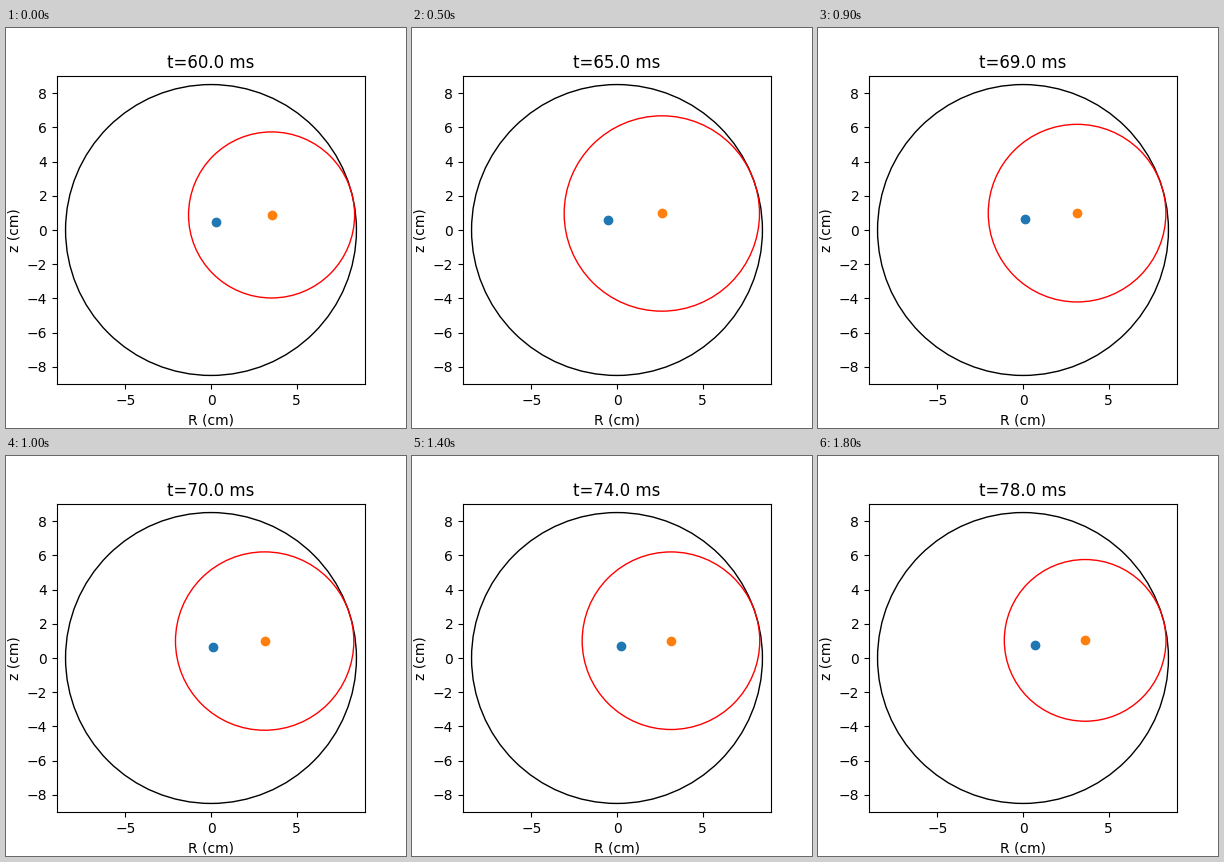
Recreate the animation shown at these times as a matplotlib script. Size 400x400 px, loop 1.9 s.

```python
import numpy as np
import matplotlib.pyplot as plt
from matplotlib.animation import FuncAnimation

WALL = 8.5              # vessel radius, cm
START, FRAMES = 60, 19  # ms
CRASH, RECOVERY = 4, 4  # ms from the start, ms of rebound


def smoothstep(x):
    x = np.clip(x, 0, 1)
    return x * x * (3 - 2 * x)


def plasma_centre(s):
    """Return R, z and the outward growth, s ms after the start."""
    if s < CRASH:                       # steady outward drift
        growth = 0.29 * s
        return 3.54 + growth, 0.88 - 0.023 * s, growth
    if s == CRASH:                      # sudden jump inward
        return 0.68, 0.44, 0
    u = s - CRASH - 1                   # rebound, then renewed drift
    w = max(u - RECOVERY, 0)
    growth = 0.00096 * w**3 - 0.0253 * w
    r = 2.62 + 0.54 * smoothstep(u / RECOVERY) + growth
    return r, 0.965 + 0.005 * u, growth


fig, ax = plt.subplots(figsize=(4, 4), dpi=100)
ax.set_aspect("equal")
ax.set_xlim(-9, 9)
ax.set_ylim(-9, 9)
ax.set_xticks([-5, 0, 5])
ax.set_yticks(range(-8, 9, 2))
ax.set_xlabel("R (cm)")
ax.set_ylabel("z (cm)")
title = ax.set_title("")

ax.add_patch(plt.Circle((0, 0), WALL, fill=False, color="black"))
edge = ax.add_patch(plt.Circle((0, 0), 1, fill=False, color="red"))
current_dot, = ax.plot([], [], "o", color="tab:blue")
plasma_dot, = ax.plot([], [], "o", color="tab:orange")


def update(s):
    r, z, growth = plasma_centre(s)
    # The plasma edge always touches the wall
    edge.set_center((r, z))
    edge.set_radius(WALL - np.hypot(r, z))
    plasma_dot.set_data([r], [z])
    # The current centre trails at a slowly shrinking offset
    gap_r = 3.25 - 0.023 * s + 0.14 * growth
    gap_z = 0.41 - 0.009 * s
    current_dot.set_data([r - gap_r], [z - gap_z])
    title.set_text(f"t={START + s:.1f} ms")
    return edge, plasma_dot, current_dot, title


anim = FuncAnimation(fig, update, frames=FRAMES, interval=100, repeat=True)
plt.show()
```
